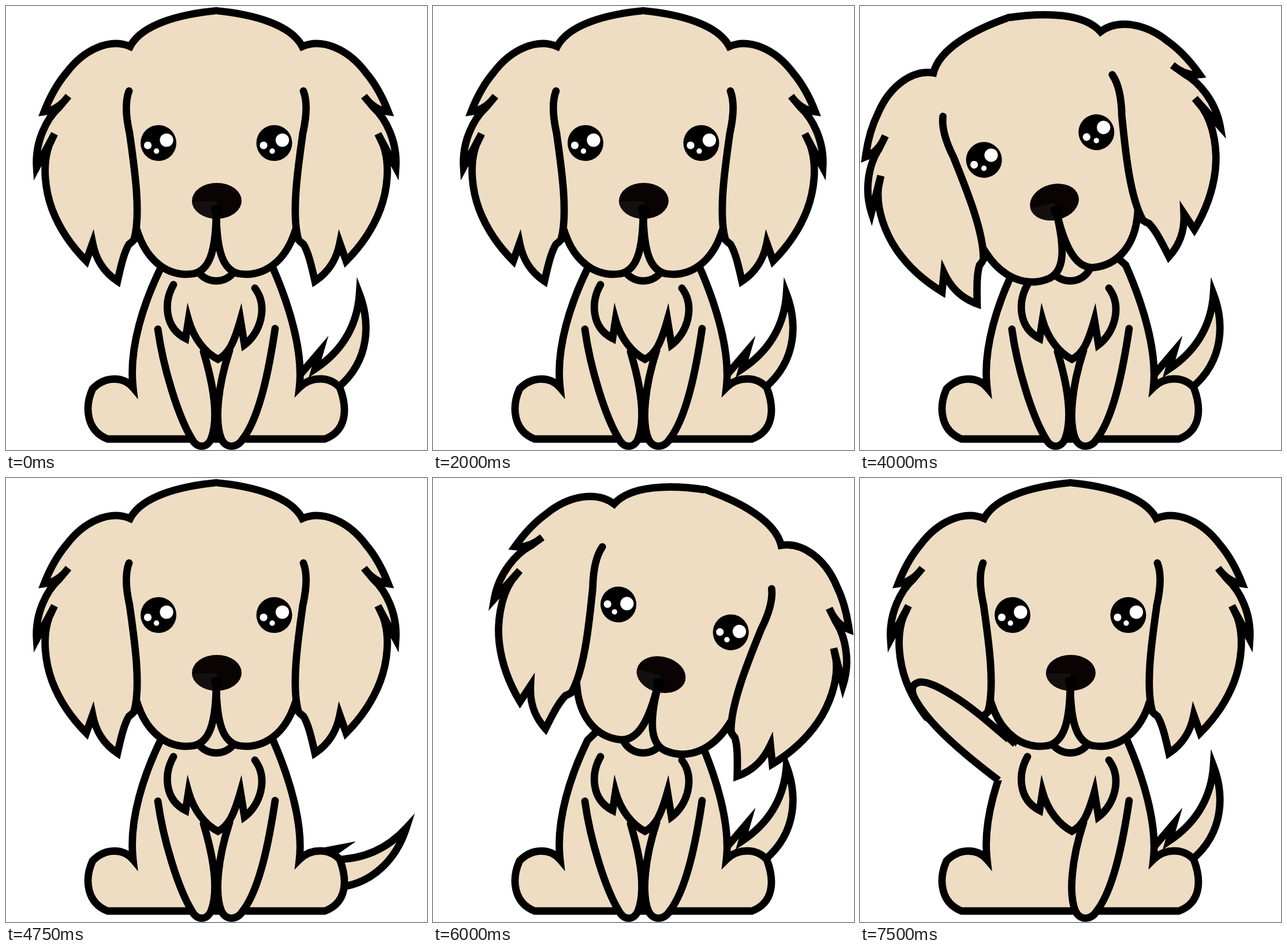
An HTML page that plays this animation: 729x768 px, repeating every 7750 ms.

```html
<!DOCTYPE html>
<html lang="en">
<head>
<meta charset="utf-8">
<title>Puppy</title>
<style>
  html, body { margin: 0; width: 100%; height: 100%; overflow: hidden; background: #fff; }
  svg { display: block; width: 100vw; height: 100vh; }
  .ink { fill: none; stroke: #000; stroke-width: 12.8; stroke-miterlimit: 7; }
  .fur { fill: #eeddc2; }
  .round { stroke-linecap: round; }
</style>
</head>
<body>
<svg viewBox="0 0 729 768">
  <defs>
    <g id="half">
      <path class="ink fur" d="M366 8 C300 14 235 32 215 70 C180 55 135 75 105 115 C88 135 75 160 66 183
        Q90 180 108 156 L92 175 C70 195 50 235 53 279 L84 221 L75 240 C62 275 68 320 80 352
        C93 386 115 417 139 441 L150 410 C155 435 166 458 193 476 C200 445 205 425 213 412
        Q222 406 229 394 C245 440 280 470 325 463 C352 457 364 425 364 352"/>
      <path class="ink round" d="M213 147 C205 168 209 198 214 220 C220 265 235 355 222 403"/>
    </g>
    <g id="eye">
      <circle r="31"/>
      <g fill="#fff">
        <circle cx="14" cy="-5" r="11.6"/>
        <circle cx="-18.5" cy="4" r="6.6"/>
        <circle cx="-3.5" cy="14" r="4.7"/>
      </g>
    </g>
  </defs>

  <path id="tail" class="ink fur" d="M497 652 L544 597 L535 628 C580 598 608 555 612 498 C630 545 632 612 575 660"/>

  <path class="ink fur" d="M290 432 L268 453 C240 510 212 590 220 660 C203 640 172 640 150 662
    C135 695 140 735 176 749 H552 C590 735 592 697 578 660 C560 640 528 640 508 660 C515 600 492 520 460 448 L440 430"/>
  <path id="leg" class="ink fur round" d="M263 559 C272 625 298 710 322 749 C331 766 348 765 355 749 C368 715 362 665 342 598"/>
  <path class="ink fur round" d="M466 558 C456 625 440 710 410 749 C400 765 381 766 373 749 C361 720 366 660 387 596"/>
  <path class="ink fur round" d="M290 482 C273 512 274 556 311 575 L316 543 C325 575 345 600 367 611
    C385 602 394 585 406 543 L413 586 C440 566 455 520 431 488"/>
  <path class="fur" d="M335 400 H395 V465 H335z"/>
  <path class="ink fur" d="M328 450 C340 484 388 484 400 450"/>

  <g id="head">
    <use href="#half"/>
    <use href="#half" transform="translate(728) scale(-1 1)"/>
    <path d="M364 14.4 V340" stroke="#eeddc2" stroke-width="4"/>
    <ellipse cx="365" cy="337" rx="43" ry="31" fill="#0a0304"/>
    <path d="M322 338 H365 V368 A43 31 0 0 1 322 338z" fill="#151010"/>
    <rect x="355" y="344" width="20" height="17" rx="6"/>
    <path class="ink" d="M364.5 350 V395"/>
    <g id="eyes"></g>
  </g>

  <g id="arm">
    <path d="M112 419 L150 449 L212 512 L190 530 L120 470z" fill="#fff"/>
    <path class="fur" d="M266 460 C240 438 200 400 160 376 L97 385 C120 425 170 470 238 523 L262 523 L274 470z"/>
    <path class="ink fur" d="M268 461 C240 438 200 400 160 376 C130 357 110 350 100 354 C88 358 88 370 97 385 C120 425 170 470 240 523"/>
    <path class="fur" d="M254 455 L266 466 L274 470 L262 517 L243 517z"/>
  </g>
</svg>
<script>
  const $ = id => document.getElementById(id);
  const STEP = 250, COUNT = 31;
  const pose = {
    squint: [3, 5],
    left: [10, 12, 14, 16],
    right: [22, 24],
    wave: [26, 28, 30]
  };

  function eyes(squint) {
    const k = squint ? 0.683 : 1;
    return [264, 464.5].map(x =>
      `<use href="#eye" transform="translate(${x} ${268 - 31 * k}) scale(1 ${k})"/>`).join('');
  }

  let last = -1;
  function draw(time) {
    const n = Math.floor(time / STEP) % COUNT;
    if (n === last) return;
    last = n;
    const is = name => pose[name].includes(n);
    const wave = is('wave');
    $('tail').setAttribute('transform', n % 2 ? 'rotate(38.7 499.3 667.2)' : '');
    $('head').setAttribute('transform',
      is('left') ? 'rotate(-13.83 359.75 455)' :
      is('right') ? 'rotate(13.9 367.5 462)' : '');
    $('eyes').innerHTML = eyes(is('squint'));
    $('arm').style.display = wave ? '' : 'none';
    $('leg').style.display = wave ? 'none' : '';
  }

  const start = performance.now();
  function tick() {
    draw(performance.now() - start);
    requestAnimationFrame(tick);
  }
  tick();
</script>
</body>
</html>
```
